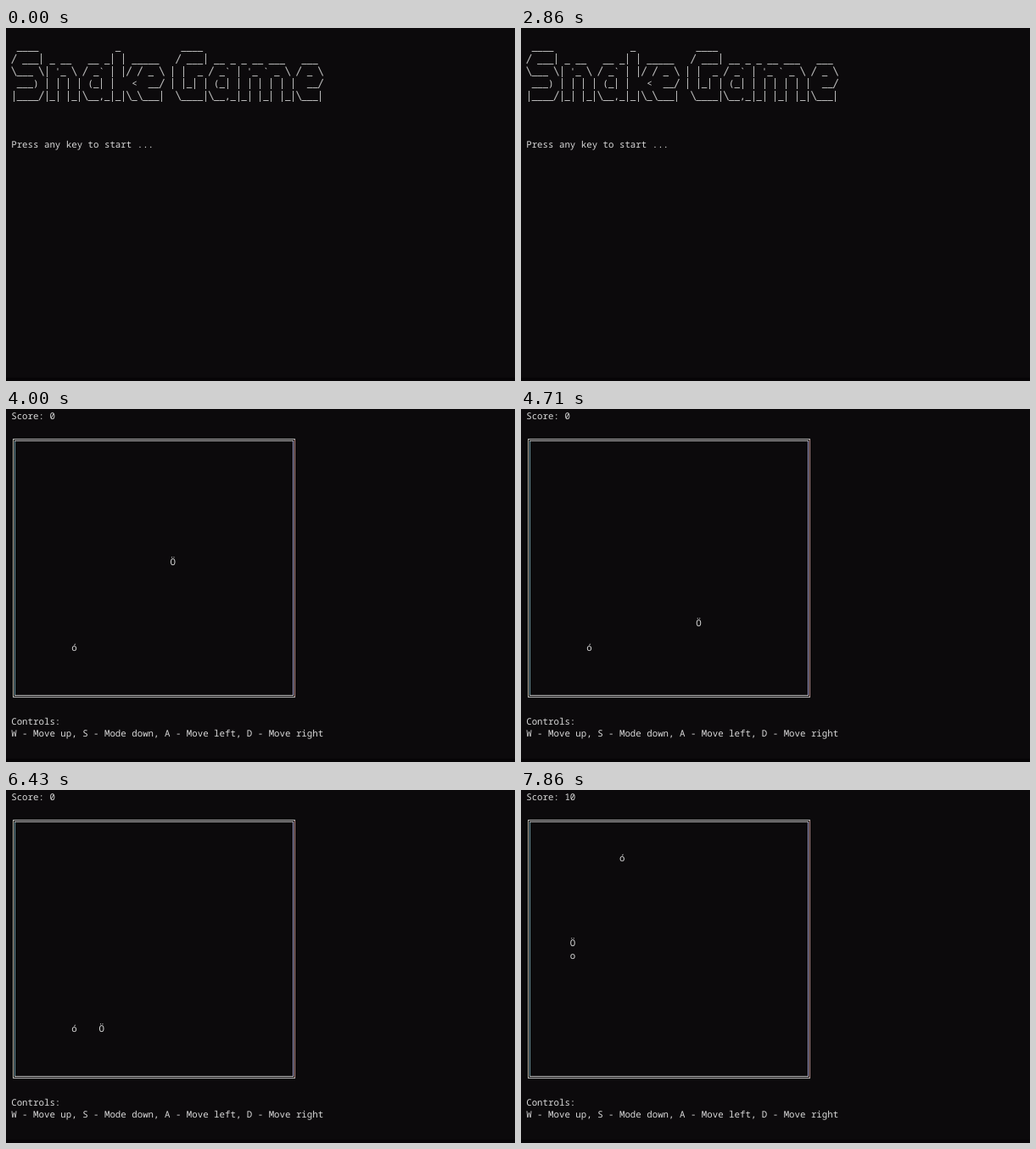
These frames come from a looping animation (600 px wide and 416 px high, 8 s). An HTML page with a canvas:

```html
<!DOCTYPE html>
<html lang="en">
<head>
<meta charset="utf-8">
<title>Snake Game</title>
<style>
  html, body { margin: 0; width: 100%; height: 100%; overflow: hidden; background: #0c0a0c; }
  canvas { display: block; width: 600px; height: 416px; }
</style>
</head>
<body>
<canvas id="stage" width="600" height="416"></canvas>
<script>
const ctx = document.getElementById('stage').getContext('2d');

const LOOP = 8000, FPS = 7;
const CELL_W = 6.456, CELL_H = 14.4, LEFT = 6.2, BASELINE = 11.5;
const GAME_START = 3000, MOVE_START = 3598, MOVE_TIME = 99;
const SCORE_TIME = 6850, MEAL = 33;
const TEXT = '#dadada', LINE = '#b8b8b8';

const BANNER = [
  " ____              _           ____",
  "/ ___| _ __   __ _| | _____   / ___| __ _ _ __ ___   ___",
  "\\___ \\| '_ \\ / _` | |/ / _ \\ | |  _ / _` | '_ ` _ \\ / _ \\",
  " ___) | | | | (_| |   <  __/ | |_| | (_| | | | | | |  __/",
  "|____/|_| |_|\\__,_|_|\\_\\___|  \\____|\\__,_|_| |_| |_|\\___|"
];

// Legs of the snake's walk: dx, dy, number of cells
const LEGS = [[1, 0, 6], [0, 1, 7], [-1, 0, 23], [0, -1, 7]];

function walk(moves) {
  let col = 25, row = 12;
  for (const [dx, dy, len] of LEGS) {
    const n = Math.min(moves, len);
    col += dx * n;
    row += dy * n;
    moves -= n;
  }
  return [col, row];
}

function bar(color, x, y, w, h) {
  ctx.fillStyle = color;
  ctx.fillRect(x, y, w, h);
}

function slant(x, y1, y2) {
  ctx.strokeStyle = LINE;
  ctx.lineWidth = 1.1;
  ctx.beginPath();
  ctx.moveTo(x + 0.6, y1);
  ctx.lineTo(x + CELL_W - 0.6, y2);
  ctx.stroke();
}

// Line characters fill the height or width of their cell
const STROKES = {
  '|': (x, y) => bar(LINE, Math.floor(x + CELL_W / 2), Math.round(y - 10), 1, 13),
  '_': (x, y) => bar(LINE, x, Math.round(y + 1.2), CELL_W, 1),
  '/': (x, y) => slant(x, y + 1.8, y - 9.2),
  '\\': (x, y) => slant(x, y - 9.2, y + 1.8)
};

// Terminal text: one glyph per grid cell
function print(text, col, row) {
  const y = row * CELL_H + BASELINE;
  [...text].forEach((ch, i) => {
    const x = LEFT + (col + i) * CELL_W;
    if (STROKES[ch]) {
      STROKES[ch](x, y);
    } else if (ch !== ' ') {
      ctx.fillStyle = TEXT;
      ctx.fillText(ch, x, y);
    }
  });
}

function drawWalls() {
  bar('#b9b9ab', 8, 35, 1, 305);
  bar('#6f9aa6', 10, 37, 1, 301);
  bar('#a9a3cb', 338, 37, 1, 301);
  bar('#b98f8c', 340, 35, 1, 305);
  for (const y of [35, 339]) bar(LINE, 8, y, 333, 1);
  for (const y of [37, 337]) bar(LINE, 10, y, 329, 1);
}

function drawTitle() {
  BANNER.forEach((line, i) => print(line, 0, i + 1));
  print('Press any key to start ...', 0, 9);
}

function drawGame(t) {
  const moves = Math.max(0, Math.floor((t - MOVE_START) / MOVE_TIME));
  print('Score: ' + (t >= SCORE_TIME ? 10 : 0), 0, 0);
  print('Controls:', 0, 25);
  print('W - Move up, S - Mode down, A - Move left, D - Move right', 0, 26);
  if (moves >= MEAL) {
    print('ó', 17, 5);
    print('o', ...walk(moves - 1));
  } else {
    print('ó', 11, 19);
  }
  print('Ö', ...walk(moves));
  drawWalls();
}

function draw(now) {
  // The screen refreshes seven times a second
  const tick = Math.floor(((now % LOOP) + 5) * FPS / 1000);
  const t = Math.min(Math.round(tick * 100 / FPS) * 10, LOOP - 1);
  bar('#0c0a0c', 0, 0, 600, 416);
  bar('#070507', 0, 412, 600, 4);
  ctx.font = '500 ' + CELL_W / 0.6 + 'px "Noto Sans Mono", "DejaVu Sans Mono", monospace';
  ctx.textRendering = 'geometricPrecision';
  if (t < GAME_START) drawTitle();
  else drawGame(t);
}

const start = performance.now();
function loop() {
  draw(performance.now() - start);
  requestAnimationFrame(loop);
}
loop();
</script>
</body>
</html>
```
